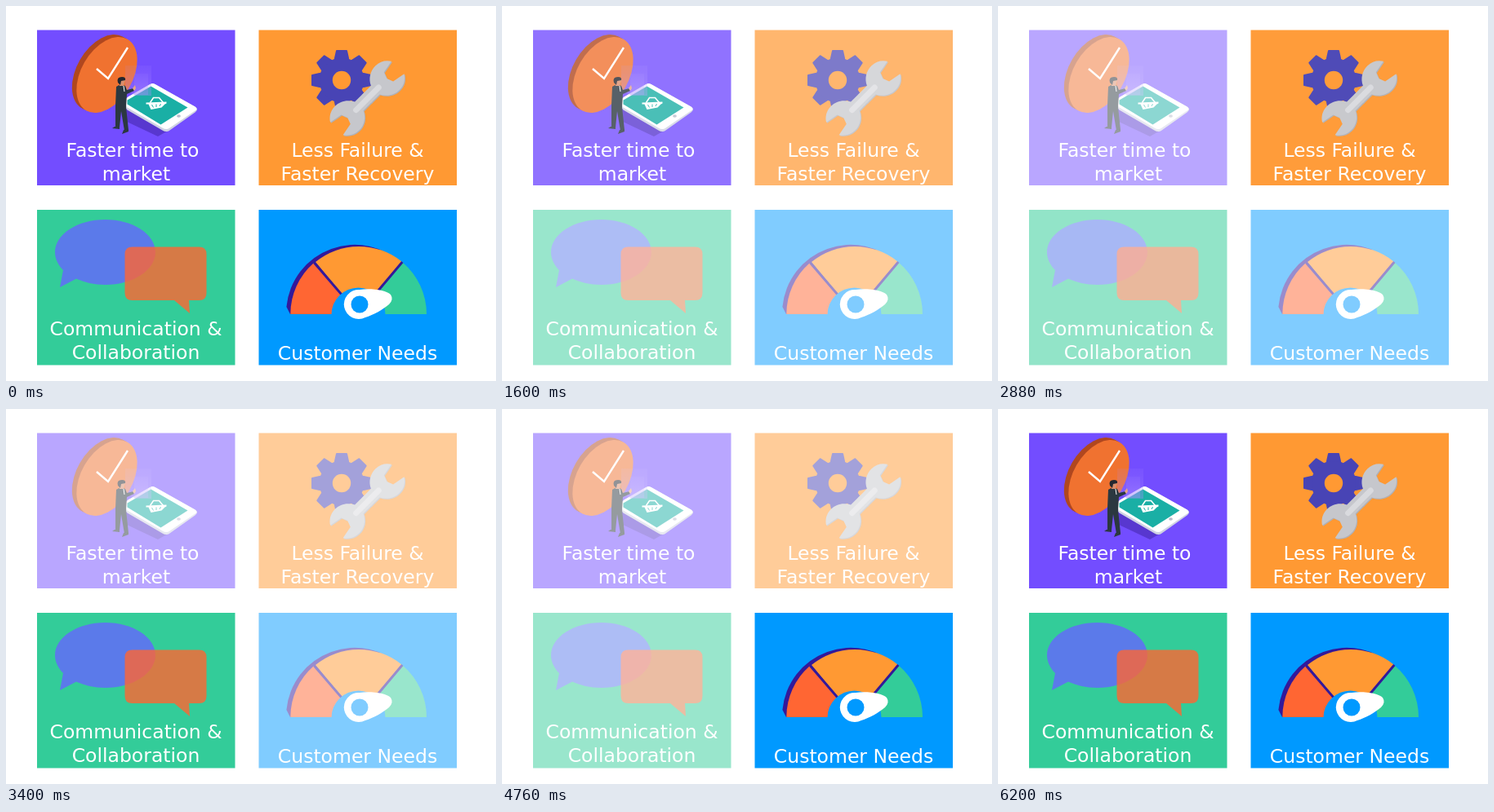
These frames come from a looping animation (600x460 px, 6720 ms). An HTML page:

```html
<!DOCTYPE html>
<html lang="en">
<head>
<meta charset="utf-8">
<title>Four benefits</title>
<style>
  html, body { margin: 0; width: 100%; height: 100%; overflow: hidden; background: #fff; }
  svg { display: block; width: 600px; height: 460px; }
  text { font: 23.5px "DejaVu Sans", sans-serif; fill: #fff; text-anchor: middle; }

  /* Cards take turns at full strength, stepping every 40 ms. */
  .card { animation: 6720ms steps(12, start) infinite; }
  #speed { animation-name: speed; }
  #repair { animation-name: repair; }
  #talk { animation-name: talk; }
  #needs { animation-name: needs; }

  @keyframes speed {
    0%, 21.42% { opacity: 1; }
    28.57%, 85.71% { opacity: .5; }
    92.85%, 100% { opacity: 1; }
  }
  @keyframes repair {
    0% { opacity: 1; }
    .59% { opacity: 1; animation-timing-function: steps(11, start); }
    7.14%, 21.42% { opacity: .5; }
    28.57% { opacity: 1; }
    42.85% { opacity: 1; animation-timing-function: steps(14, start); }
    51.18%, 85.71% { opacity: .5; }
    92.85%, 100% { opacity: 1; }
  }
  @keyframes talk {
    0% { opacity: 1; }
    .59% { opacity: 1; animation-timing-function: steps(11, start); }
    7.14% { opacity: .5; }
    42.85% { opacity: .5; animation-timing-function: steps(14, start); }
    51.18% { opacity: 1; }
    64.88% { opacity: 1; animation-timing-function: steps(11, start); }
    71.42%, 85.71% { opacity: .5; }
    92.85%, 100% { opacity: 1; }
  }
  @keyframes needs {
    0% { opacity: 1; }
    .59% { opacity: 1; animation-timing-function: steps(11, start); }
    7.14% { opacity: .5; }
    64.88% { opacity: .5; animation-timing-function: steps(11, start); }
    71.42%, 100% { opacity: 1; }
  }
</style>
</head>
<body>
<svg viewBox="0 0 600 460">
  <defs>
    <ellipse id="coin" rx="31.5" ry="50.5" transform="rotate(30)"/>
    <path id="cog" d="M-6-36H6L8-27V27L6 36H-6L-8 27V-27Z" stroke-width="2" stroke-linejoin="round"/>
    <path id="jaw" d="M-1-7.500H14C18-16 26-21 35-21C43-21 49-17 53-11L37-8L34 0L37 8L53 11C49 17 43 21 35 21C26 21 18 16 14 7.500H-1Z"/>
    <g id="wrench">
      <use href="#jaw"/>
      <use href="#jaw" transform="scale(-1 1)"/>
    </g>
    <linearGradient id="glow" x2="0" y2="1">
      <stop offset="0" stop-color="#a98bff" stop-opacity=".1"/>
      <stop offset="1" stop-color="#a98bff" stop-opacity=".35"/>
    </linearGradient>
  </defs>

  <g id="speed" class="card">
    <path d="M38 29.5H280.500V220H38Z" fill="#734dff"/>
    <g fill="#b0471f">
      <use href="#coin" x="118" y="81.5"/>
      <use href="#coin" x="120.7" y="83"/>
    </g>
    <use href="#coin" x="123.5" y="84.5" fill="#f07230"/>
    <path d="M111 77L125 89L149 51" fill="none" stroke="#fff" stroke-width="2.4"/>

    <path d="M147 126L200 152L186 160L146 141Z" fill="#4a2bb5" opacity=".65"/>
    <g transform="translate(-.5 1.5)">
      <path d="M147 115Q147 112 150 110L176 95Q180 92 184 95L232 122Q237 125 232 129L201 151Q197 154 192 151L149 126Q147 124 147 122Z" fill="#cfd2e3"/>
      <path d="M147 114Q147 112 150 110L176 95Q180 92 184 95L232 122Q236 125 232 127L201 148Q197 151 192 148L149 123Q147 121 147 118Z" fill="#fff"/>
      <path d="M178 97L223 123L190 144L149 119V114Z" fill="#1aafa5"/>
      <ellipse cx="212" cy="133.500" rx="2.4" ry="1.7" fill="#b9bccb"/>
      <path d="M177 117L181 111L188 111L193 117" fill="none" stroke="#fff" stroke-width="1.6"/>
      <path d="M172 117L197 116V118L195 119L191 123L178 125.500L175 119H172Z" fill="#fff"/>
      <path d="M179 119.500L181 123M184.500 119V122.500M190 118.500L188.500 121.500" stroke="#1aafa5"/>
    </g>

    <path d="M146 73H178V110H158L146 102Z" fill="url(#glow)"/>
    <path d="M157 83H174V109H157Z" fill="url(#glow)"/>

    <g fill="#2b3840">
      <path d="M135 99Q140 95 146 98L148 103L156 101L157 104L148 108L147 124L150 152L145 153L141 129L139 149L134 149L134 122Z"/>
      <path d="M133 148H139V151L130 150ZM144 152L150 151V154L142 157Z"/>
    </g>
    <path d="M138 90Q142 87 146 91L144 98H139Z" fill="#d98d6b"/>
    <path d="M137 94Q135 87 142 87Q147 87 146 91L141 92L140 97Z" fill="#24272f"/>
    <path d="M155 101L158 97L159 101L157 104Z" fill="#e7a685"/>
    <path d="M144 98L145 105" stroke="#fff"/>
    <text x="155" y="184.5">Faster time to</text>
    <text x="159.5" y="213.5">market</text>
  </g>

  <g id="repair" class="card">
    <path d="M309.5 29.5H552V220H309.5Z" fill="#f93"/>
    <g transform="translate(411 91)" fill="#4844b5" stroke="#4844b5">
      <use href="#cog"/>
      <use href="#cog" transform="rotate(45)"/>
      <use href="#cog" transform="rotate(90)"/>
      <use href="#cog" transform="rotate(135)"/>
      <circle r="27"/>
      <circle r="11.2" fill="#f93" stroke="none"/>
    </g>
    <g transform="translate(442.8 113.5) rotate(-45)">
      <use href="#wrench" y=".7" fill="#aeb0b8"/>
      <use href="#wrench" y="-.7" fill="#c6c7cc"/>
      <path d="M-20 0H19" stroke="#d9dade" stroke-width="7" stroke-linecap="round"/>
    </g>
    <text x="430.5" y="184.5">Less Failure &amp;</text>
    <text x="430.5" y="213.5">Faster Recovery</text>
  </g>

  <g id="talk" class="card">
    <path d="M38 250H280.500V440.5H38Z" fill="#3c9"/>
    <path d="M70 324C64 318 60 310 60 302C60 280 87.500 262 121.500 262S183 280 183 302S155.500 342 121.500 342C108 342 96 339 86 334.500L66 345Z" fill="#66f" opacity=".8"/>
    <path d="M154.500 295.500H236.500Q245.500 295.500 245.500 304.500V352Q245.500 361 236.500 361H224L225 377L206 361H154.500Q145.500 361 145.500 352V304.500Q145.500 295.500 154.500 295.500Z" fill="#f63" opacity=".8"/>
    <text x="159" y="404">Communication &amp;</text>
    <text x="159" y="433">Collaboration</text>
  </g>

  <g id="needs" class="card">
    <path d="M309.5 250H552V440.5H309.5Z" fill="#09f"/>
    <path d="M348 378L343.400 369A84 84 0 0 1 486 317L432 378Z" fill="#33199a"/>
    <path d="M431.500 378H348.300A83.200 83.200 0 0 1 376.500 315.500Z" fill="#f63"/>
    <path d="M431.500 378L379 314A83.200 83.200 0 0 1 484.500 313.500Z" fill="#f93"/>
    <path d="M431.500 378L485.500 314.500A83.200 83.200 0 0 1 515 378Z" fill="#3c9"/>
    <path d="M377.500 315L431.500 378L485.300 314" fill="none" stroke="#33199a" stroke-width="3"/>
    <path d="M398.500 378.500A33 33 0 0 1 464.500 378.500Z" fill="#09f"/>
    <path d="M433 348C448 346 466 349 471 354Q475 360 469 366C462 372 450 379 440 382A18 18 0 1 1 433 348Z" fill="#fff"/>
    <circle cx="433" cy="366" r="10.5" fill="#09f"/>
    <text x="430.5" y="433.5">Customer Needs</text>
  </g>
</svg>
</body>
</html>
```
